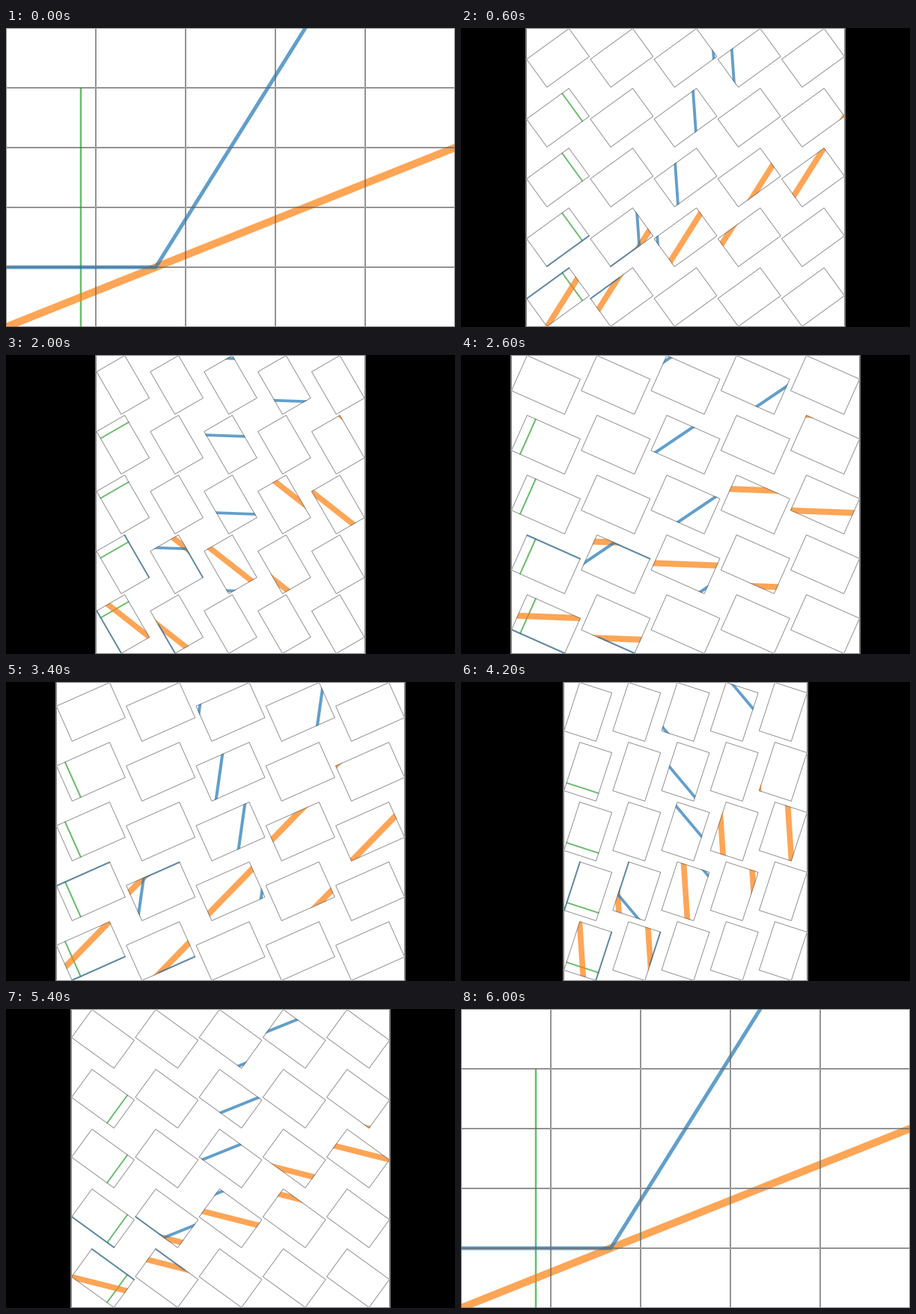
Recreate the animation shown at these times as a matplotlib script. Size 600 by 400 pixels, loop 6200 ms.

```python
import math

import matplotlib.pyplot as plt
from matplotlib.animation import FuncAnimation
from matplotlib.lines import Line2D
from matplotlib.patches import Rectangle
from matplotlib.path import Path
from matplotlib.transforms import Affine2D

W, H, DPI = 600, 400, 100
N = 5
TW, TH = W / N, H / N
STEPS = 30
PT = 72 / DPI

# points, colour, width in pixels, from back to front
CURVES = [
    ([(100, 420), (100, 80)], "tab:green", 2.5),
    ([(-20, 408), (620, 152)], "tab:orange", 10),
    ([(-20, 320), (200, 320), (420, -32)], "tab:blue", 5),
]

fig = plt.figure(figsize=(W / DPI, H / DPI), dpi=DPI, facecolor="black")
ax = fig.add_axes([0, 0, 1, 1])
ax.set_xlim(0, W)
ax.set_ylim(H, 0)
ax.axis("off")

sheet = ax.add_patch(Rectangle((0, 0), W, H, fc="white", ec="gray", lw=2 * PT))


class Tile:
    """One cell of the drawing, turned about its own centre."""

    def __init__(self, row, col):
        self.row, self.col = row, col
        self.x, self.y = col * TW, row * TH
        self.move = Affine2D()
        trans = self.move + ax.transData
        x0, y0, x1, y1 = self.x, self.y, self.x + TW, self.y + TH
        clip = Path([(x0, y0), (x1, y0), (x1, y1), (x0, y1), (x0, y0)],
                    closed=True)
        ax.add_artist(Rectangle((x0, y0), TW, TH, fc="white", lw=0,
                                transform=trans, snap=False))
        self.lines = []
        for points, color, width in CURVES:
            line = Line2D(*zip(*points), color=color, alpha=0.7,
                          solid_capstyle="butt", transform=trans, snap=False,
                          zorder=1)
            ax.add_artist(line)
            line.set_clip_path(clip, trans)
            self.lines.append((line, width))
        self.border = Rectangle((0, 0), 1, 1, fill=False, ec="#666666",
                                alpha=0.7, lw=PT, transform=trans, snap=False)
        ax.add_artist(self.border)

    def turn(self, angle, scale, left, step):
        self.move.clear()
        self.move.translate(-self.x - TW / 2, -self.y - TH / 2)
        self.move.rotate_deg(-angle).scale(scale)
        self.move.translate(left + (self.col + 0.5) * step,
                            (self.row + 0.5) * TH)
        inset = 0.5 / scale
        self.border.set_bounds(self.x + inset, self.y + inset,
                               TW - 2 * inset, TH - 2 * inset)
        for line, width in self.lines:
            line.set_linewidth(width * PT * math.sqrt(scale))


tiles = [Tile(r, c) for r in range(N) for c in range(N)]


def update(i):
    angle = 360 * i / STEPS
    c = abs(math.cos(math.radians(angle)))
    s = abs(math.sin(math.radians(angle)))
    box_w, box_h = TW * c + TH * s, TW * s + TH * c
    scale = TH / box_h
    step = box_w * scale
    left = (W - N * step) / 2
    sheet.set_bounds(left, 0, N * step, H)
    for tile in tiles:
        tile.turn(angle, scale, left, step)
    return []


anim = FuncAnimation(fig, update, frames=STEPS + 1, interval=200,
                     repeat=True, repeat_delay=0)
plt.show()
```
